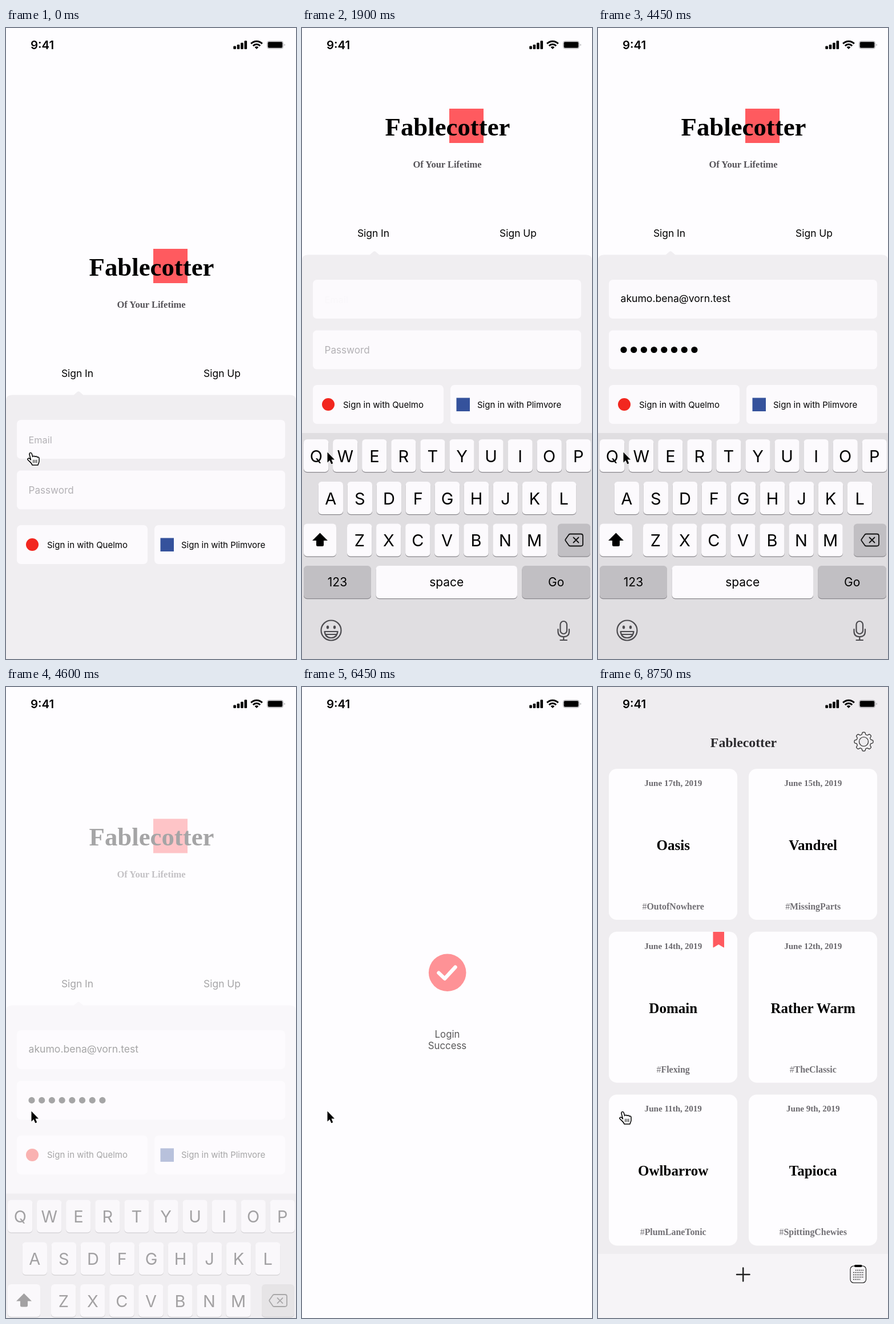
An HTML page that plays this animation: 508x1103 px, repeating every 9300 ms.

```html
<!DOCTYPE html>
<html lang="en">
<head>
<meta charset="utf-8">
<title>Sign-in flow</title>
<style>
  html, body { margin: 0; width: 100%; height: 100%; overflow: hidden; background: #fefdff; }
  svg { display: block; width: 100%; height: 100%; }
  text { font-family: Inter, "Liberation Sans", sans-serif; }
  .serif { font-family: "Liberation Serif", serif; font-weight: 700; }
  .mid { text-anchor: middle; }
  .line { fill: none; stroke-linecap: round; stroke-linejoin: round; }
</style>
</head>
<body>
<svg id="stage" viewBox="0 0 508 1103">
  <rect width="508" height="1103" fill="#fefdff"/>

  <g id="login">
    <g id="logo">
      <rect x="258" y="386" width="60" height="60" fill="#ff5a5f"/>
      <text class="serif mid" x="255" y="433" font-size="44.8">Fablecotter</text>
      <text class="serif mid" x="254.5" y="489" font-size="16.5" fill="#555358">Of Your Lifetime</text>
    </g>
    <g id="form">
      <text class="mid" x="125" y="610" font-size="17.4">Sign In</text>
      <text class="mid" x="378.5" y="610" font-size="17.4">Sign Up</text>
      <path d="M0 1400V651.500Q0 641.500 10 641.500H118.500L125 636Q127 634.500 129 636L135.500 641.500H498Q508 641.500 508 651.500V1400Z" fill="#f0eef1"/>
      <g id="fields" fill="#fcfafd"></g>
      <g fill="#b3b1b5">
        <text id="emailHint" x="39.500" y="726" font-size="16.3">Email</text>
        <text id="passHint" x="39.500" y="814" font-size="17.1">Password</text>
      </g>
      <text id="email" x="39.500" y="724" font-size="17.6"></text>
      <g id="dots"></g>
      <circle cx="46" cy="903" r="11" fill="#f2271f"/>
      <text x="72" y="908.500" font-size="15">Sign in with Quelmo</text>
      <rect x="270.500" y="891.500" width="23.500" height="23.500" fill="#35529c"/>
      <text x="307" y="908.500" font-size="15">Sign in with Plimvore</text>
    </g>
    <g id="keyboard">
      <rect y="708" width="508" height="700" fill="#e0dee1"/>
      <g id="keys"></g>
      <path d="M31.500 882.500L45 896H38V903.500Q38 906 35.500 906H27.500Q25 906 25 903.500V896H18Z"/>
      <path class="line" stroke="#111" stroke-width="1.800" d="M470 884.500H488.500Q492 884.500 492 888V902Q492 905.500 488.500 905.500H470Q468.500 905.500 467.500 904.500L461.500 896Q461 895 461.500 894L467.500 885.500Q468.500 884.500 470 884.500ZM475.500 890.500L484.500 899.500M484.500 890.500L475.500 899.500"/>
      <g class="line" stroke="#4c4b4f" stroke-width="2.200">
        <circle cx="51" cy="1053" r="17.500"/>
        <path d="M39.500 1055H62.500Q61 1066 51 1066T39.500 1055ZM41.500 1060H60.500"/>
        <rect x="452.500" y="1037" width="11.500" height="22" rx="5.700"/>
        <path d="M448.500 1051V1055Q448.500 1064 458.300 1064T468 1055V1051M458.300 1064V1070M452.500 1070H464"/>
      </g>
      <g fill="#4c4b4f">
        <ellipse cx="45" cy="1047.500" rx="2.200" ry="3"/>
        <ellipse cx="57" cy="1047.500" rx="2.200" ry="3"/>
      </g>
    </g>
  </g>

  <g id="success">
    <g id="badge">
      <circle id="disc" cx="254.700" cy="525" r="32.800" fill="#ff5a5f"/>
      <path id="tick" class="line" d="M239.500 525.500L250 535.500L268.500 515.500" stroke="#fff" stroke-width="6.500" pathLength="1" stroke-dasharray="1 2"/>
    </g>
    <g id="message" class="mid" font-size="16.800">
      <text x="254.500" y="587">Login</text>
      <text x="254.500" y="607.500">Success</text>
    </g>
  </g>

  <g id="home">
    <rect width="508" height="1103" fill="#efedf0"/>
    <text class="serif mid" x="255" y="105" font-size="23.800" fill="#2d2c2f">Fablecotter</text>
    <g class="line" stroke="#222" stroke-width="1.200">
      <path id="gear"/>
      <circle cx="465.500" cy="95.500" r="8"/>
    </g>
    <g id="cards"></g>
    <path d="M201.500 428H221V454.500Q221 456 219.500 455L211.200 450L203 455Q201.500 456 201.500 454.500Z" fill="#ff5a5f"/>
    <rect y="991" width="508" height="112" fill="#f6f4f7"/>
    <path class="line" d="M243 1027H265.500M254.200 1015.500V1038.500" stroke="#222" stroke-width="2.500"/>
    <rect class="line" x="442" y="1012" width="27.500" height="29.500" rx="6" stroke="#111" stroke-width="1.100"/>
    <rect x="449" y="1010" width="13.500" height="4" rx="1.800"/>
    <path d="M451 1019.500H466M447 1023.500H466M447 1027.500H466M447 1031.500H466M447 1035.500H460" stroke="#111" stroke-width="1.500" stroke-dasharray="1.500 1.600"/>
  </g>

  <g id="status">
    <text x="43" y="37" font-size="20.400" font-weight="600">9:41</text>
    <g id="bars"></g>
    <path d="M429.200 27.400A13.500 13.500 0 0 1 448.800 27.400M432.800 31.200A8.700 8.700 0 0 1 445.200 31.200" fill="none" stroke="#000" stroke-width="3"/>
    <path d="M439 37L435.600 33.500A4.900 4.900 0 0 1 442.400 33.500Z"/>
    <rect x="457.500" y="23" width="28" height="13" rx="3.500" fill="none" stroke="#aaa8ac"/>
    <rect x="458.700" y="24.200" width="25.600" height="10.600" rx="2"/>
    <path d="M487.500 27.500Q490 29.500 487.500 31.500Z" fill="#99979b"/>
  </g>

  <path id="arrow" d="M44.500 741.500V759.500L48.500 755.800L51.300 762.300L54.200 761L51.500 754.600H57Z" stroke="#fff" stroke-width="1.200" paint-order="stroke"/>
  <g id="hand" class="line" stroke="#000" stroke-width="1.500">
    <path fill="#fff" d="M43.500 755L41 745.500C40.500 742 44.500 741.300 45.300 744.500L46.800 749.500C47.500 747.800 50.300 747.800 50.800 749.600C52 748.200 54.300 748.600 54.600 750.400C56 749.500 58 750.300 58 752.300V757C58 760 56.500 761 56 764H46C45 760 41 758 38.200 754.800C37 752.500 40 751.300 41.500 752.800Z"/>
    <path stroke-width="1.100" d="M47.800 755V760M50.800 755V760M53.800 755V760"/>
  </g>
</svg>

<script>
const LOOP = 9300, STEP = 50;
const EMAIL = "akumo.bena@vorn.test";
const el = Object.fromEntries([...document.querySelectorAll("[id]")].map(n => [n.id, n]));

function add(parent, tag, attrs, text = "") {
  const node = document.createElementNS("http://www.w3.org/2000/svg", tag);
  for (const name in attrs) node.setAttribute(name, attrs[name]);
  node.textContent = text;
  return parent.appendChild(node);
}

const box = (parent, x, y, width, height, rx, fill) =>
  add(parent, "rect", { x, y, width, height, rx, ...(fill && { fill }) });

function addKey(x, y, width, label, size, fill = "#fcfafd") {
  box(el.keys, x, y + 1.2, width, 57, 6, "#89878c");
  box(el.keys, x, y, width, 57, 6, fill);
  const baseline = y + (size > 25 ? 39.5 : 35.5);
  add(el.keys, "text", { class: "mid", x: x + width / 2, y: baseline, "font-size": size }, label);
}

function buildLogin() {
  for (const y of [685, 773.5]) box(el.fields, 19, y, 470, 68, 7);
  for (const x of [19, 260]) box(el.fields, x, 869, 229, 68, 7);
  for (let i = 0; i < 8; i++) add(el.dots, "circle", { cx: 45 + i * 17.7, cy: 807.5, r: 5.6 });

  const rows = [["QWERTYUIOP", 3, 719], ["ASDFGHJKL", 28.5, 793], ["ZXCVBNM", 79, 866.5]];
  for (const [letters, x, y] of rows)
    [...letters].forEach((letter, i) => addKey(x + i * 51.05, y, 43.5, letter, 29));
  const gray = "#c1bfc3";
  addKey(3, 866.5, 57, "", 21);
  addKey(448, 866.5, 57, "", 21, gray);
  addKey(3, 940, 118, "123", 21, gray);
  addKey(129.5, 940, 247.5, "space", 21);
  addKey(385.5, 940, 119.5, "Go", 21, gray);

  [5.5, 8, 11.2, 14.8].forEach((h, i) => box(el.bars, 398.3 + i * 6.4, 37 - h, 4.6, h, 1.3));
}

function buildHome() {
  const stories = [
    ["June 17th, 2019", "Oasis", "OutofNowhere"],
    ["June 15th, 2019", "Vandrel", "MissingParts"],
    ["June 14th, 2019", "Domain", "Flexing"],
    ["June 12th, 2019", "Rather Warm", "TheClassic"],
    ["June 11th, 2019", "Owlbarrow", "PlumLaneTonic"],
    ["June 9th, 2019", "Tapioca", "SpittingChewies"]
  ];
  stories.forEach(([date, title, tag], i) => {
    const x = 19 + (i % 2) * 245, y = 143 + Math.floor(i / 2) * 284.7;
    const label = (dy, size, fill, text) => add(el.cards, "text",
      { class: "serif mid", x: x + 112.7, y: y + dy, "font-size": size, fill }, text);
    box(el.cards, x, y, 225, 264, 14, "#fefdff");
    label(30, 15.1, "#6b696e", date);
    label(142, 25, "#000", title);
    const tagText = label(246, 15.9, "#727075", "");
    add(tagText, "tspan", { "font-weight": 400 }, "#");
    add(tagText, "tspan", {}, tag);
  });

  const points = Array.from({ length: 160 }, (_, i) => {
    const a = i / 160 * 2 * Math.PI;
    const r = 14.6 + 1.9 * Math.tanh(2.5 * Math.cos(8 * a));
    return (465.5 + r * Math.cos(a)).toFixed(2) + " " + (95.5 + r * Math.sin(a)).toFixed(2);
  });
  el.gear.setAttribute("d", "M" + points.join("L") + "Z");
}

const progress = (t, from, to) => Math.min(1, Math.max(0, (t - from) / (to - from)));

// Cubic Bézier timing curve, solved by bisection.
function bezier(x1, y1, x2, y2) {
  const at = (a, b, u) => 3 * a * u * (1 - u) ** 2 + 3 * b * u * u * (1 - u) + u ** 3;
  return x => {
    if (x <= 0 || x >= 1) return x <= 0 ? 0 : 1;
    let lo = 0, hi = 1;
    for (let i = 0; i < 24; i++) {
      const mid = (lo + hi) / 2;
      if (at(x1, x2, mid) < x) lo = mid; else hi = mid;
    }
    return at(y1, y2, lo);
  };
}
const ease = bezier(.25, .1, .25, 1);
const easeInOut = bezier(.42, 0, .58, 1);

const shift = (node, y) => node.setAttribute("transform", `translate(0 ${y.toFixed(2)})`);
const fade = (node, opacity) => node.setAttribute("opacity", opacity.toFixed(3));
const show = (node, visible) => node.setAttribute("visibility", visible ? "visible" : "hidden");

function render(t) {
  // Keyboard opens, then everything drifts down and leaves a faint trace.
  const open = ease(progress(t, 1140, 1590));
  const leave = ease(progress(Math.min(t, 4750), 4450, 4845));
  shift(el.logo, -245 * open + 137 * leave);
  shift(el.form, -245 * open + 245 * leave);
  shift(el.keyboard, 135.5 * (1 - open) + 272 * leave);
  fade(el.logo, 1 - leave);
  fade(el.form, 1 - leave);
  fade(el.keyboard, open * (1 - leave));
  show(el.login, t < 5350);

  fade(el.emailHint, 1 - progress(t, 1720, 1907));
  fade(el.passHint, 1 - progress(t, 3070, 3300));
  el.email.textContent = EMAIL.slice(0, Math.round(progress(t, 2400, 2900) * EMAIL.length));
  const typed = Math.round(progress(t, 3300, 3700) * 8);
  [...el.dots.children].forEach((dot, i) => fade(dot, i < typed ? 1 : 0));

  // Badge and message appear, then part vertically.
  const part = progress(t, 6270, 6575) ** 2;
  shift(el.badge, -74 * part);
  shift(el.message, 74 * part);
  fade(el.success, 1 - part);
  fade(el.disc, ease(progress(t, 5330, 5750)));
  const drawn = easeInOut(progress(t, 5650, 6000));
  el.tick.setAttribute("stroke-dashoffset", 1 - drawn);
  fade(el.tick, drawn > 0 ? 1 : 0);
  fade(el.message, easeInOut(progress(t, 5830, 6270)));

  fade(el.home, easeInOut(progress(t, 7220, 7900)));

  const pointing = t < 950 || t >= 7850;
  show(el.hand, pointing);
  show(el.arrow, !pointing);
}

function play(now) {
  render(Math.floor(now % LOOP / STEP) * STEP);
  requestAnimationFrame(play);
}

buildLogin();
buildHome();
render(0);
requestAnimationFrame(play);
</script>
</body>
</html>
```
